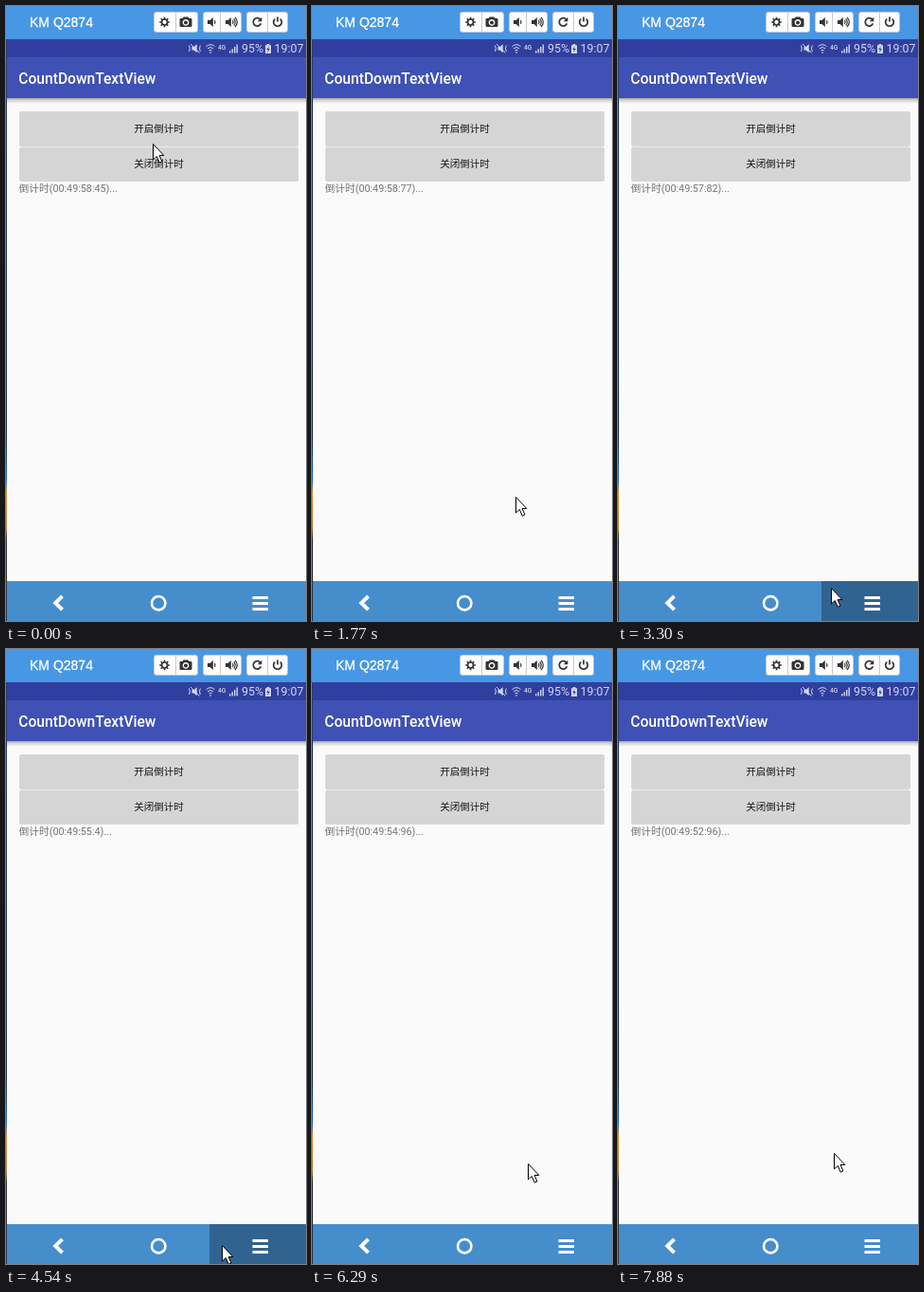
An HTML page that plays this animation: 317x648 px, repeating every 8000 ms.

```html
<!DOCTYPE html>
<html lang="zh">
<head>
<meta charset="utf-8">
<title>CountDownTextView</title>
<style>
  html, body { margin: 0; width: 100%; height: 100%; overflow: hidden; background: #fafafa; }
  svg { display: block; width: 317px; height: 648px; }
  text { font-family: Roboto, "Noto Sans CJK SC", "Noto Sans CJK", sans-serif; }
  .model { font: 14px "Liberation Sans", Arial, sans-serif; fill: #fff; stroke: #fff; stroke-width: .3; }
  .status { font-size: 12.4px; fill: #d3d7ee; }
  .title { font-size: 15.6px; font-weight: 500; fill: #fff; }
  .label { font-size: 10.5px; fill: #151515; text-anchor: middle; }
  .count { font-size: 10.75px; fill: #757575; }
  .ink { fill: #333; }
  .line { fill: none; stroke: #333; stroke-width: 1.7; }
  .thin { fill: none; stroke: #d3d7ee; stroke-width: 1; }
  .nav { fill: none; stroke: #fff; }
</style>
</head>
<body>
<svg viewBox="0 0 317 648">
  <defs>
    <linearGradient id="shade" x2="0" y2="1">
      <stop offset="0" stop-color="#000" stop-opacity=".36"/>
      <stop offset=".4" stop-color="#000" stop-opacity=".15"/>
      <stop offset="1" stop-color="#000" stop-opacity="0"/>
    </linearGradient>
    <linearGradient id="edge" x2="0" y2="1">
      <stop offset="0" stop-color="#26396b"/>
      <stop offset=".68" stop-color="#1f3550"/>
      <stop offset=".76" stop-color="#2a78b0"/>
      <stop offset=".78" stop-color="#d6a032"/>
      <stop offset=".84" stop-color="#b98a3a"/>
      <stop offset=".86" stop-color="#2b3440"/>
      <stop offset="1" stop-color="#2b3440"/>
    </linearGradient>
  </defs>

  <rect width="317" height="648" fill="#fafafa"/>

  <!-- toolbar -->
  <rect width="317" height="35" fill="#4797e5"/>
  <text class="model" x="25" y="22">KM Q2874</text>
  <g fill="#fdfdfd" stroke="#c4ccd4">
    <rect x="156.5" y="6.5" width="46" height="21" rx="2.5"/>
    <rect x="208.5" y="6.5" width="40" height="21" rx="2.5"/>
    <rect x="254.5" y="6.5" width="43" height="21" rx="2.5"/>
    <path d="M179.5 7v20M226.5 7v20M276.5 7v20"/>
  </g>
  <g transform="translate(167.5 17)" class="line">
    <circle r="3"/>
    <path id="teeth"/>
  </g>
  <g transform="translate(190 17) scale(1.08)">
    <path class="ink" d="M-6-2.5q0-1.2 1.2-1.2h1.6l1-1.5h4.4l1 1.5h1.6q1.200 0 1.200 1.200v6q0 1.200-1.200 1.200h-9.600q-1.200 0-1.200-1.200z"/>
    <circle cy=".4" r="2.5" fill="none" stroke="#fff" stroke-width="1.2"/>
  </g>
  <path class="ink" d="M213 15h2.500l3.300-3v10l-3.300-3H213zM232 15h2.500l3.300-3v10l-3.300-3H232z"/>
  <path class="line" style="stroke-width:1.2" d="M220.300 15.200q1.500 1.800 0 3.600M239.300 15.200q1.500 1.800 0 3.600M240.700 13.500q3 3.500 0 7M242 11.800q4.600 5.200 0 10.400"/>
  <path class="line" d="M268.700 14.200A4.200 4.200 0 1 0 269.400 18.400"/>
  <path class="ink" d="M270.300 11.700v4.600h-4.600z"/>
  <path class="line" d="M284.300 13.600a4.300 4.300 0 1 0 5.400 0M287 11.400v5.200"/>

  <!-- status bar -->
  <rect y="35" width="317" height="19" fill="#303f9f"/>
  <path fill="#d3d7ee" d="M196.500 43h2l3.200-2.700v8.900l-3.200-2.700h-2z"/>
  <path class="thin" d="M193.500 41.500q1.600 3.200 0 6.500M205.300 41.500q-1.600 3.200 0 6.500M195 40l9.500 9.500"/>
  <path class="thin" d="M211.500 42.600q4.500-3.800 9 0M213 44.800q3-2.500 6 0M214.500 46.900q1.500-1.200 3 0M215 49h2"/>
  <text class="status" x="224" y="45.500" style="font-size:6.600px;font-weight:500">4G</text>
  <path class="thin" style="stroke-width:1.400" d="M236.700 49.500v-2.200M239.200 49.500v-4.200M241.700 49.500v-6.500M244.200 49.500v-9"/>
  <text class="status" x="249" y="49">95%</text>
  <path fill="#d3d7ee" d="M274 41.300h1.700V40h2.600v1.300h1.700v8.700h-6z"/>
  <path fill="#303f9f" d="M277.600 42.300l-2.300 3.700h1.500l-.5 3 2.500-3.900h-1.600z"/>
  <text class="status" x="283.500" y="49">19:07</text>

  <!-- app -->
  <rect y="54" width="317" height="43" fill="#3f51b5"/>
  <rect y="97" width="317" height="6" fill="url(#shade)"/>
  <text class="title" x="13.300" y="82">CountDownTextView</text>
  <g fill="#000" fill-opacity=".14">
    <rect x="14" y="111.500" width="295" height="36.500" rx="2"/>
    <rect x="14" y="149" width="295" height="36" rx="2"/>
  </g>
  <g fill="#d5d5d5">
    <rect x="14.500" y="111" width="294" height="36" rx="1.500"/>
    <rect x="14.500" y="148.500" width="294" height="35.500" rx="1.500"/>
  </g>
  <text class="label" x="161.500" y="133">开启倒计时</text>
  <text class="label" x="161.500" y="170">关闭倒计时</text>
  <text class="count" id="count" x="13.500" y="196"></text>

  <!-- navigation -->
  <rect y="606" width="317" height="42" fill="#468dcc"/>
  <rect id="hover" x="215" y="606" width="102" height="42" fill="#316391"/>
  <path class="nav" stroke-width="4" d="M59.500 621.800l-7.300 7.200 7.300 7.200"/>
  <circle class="nav" stroke-width="2.600" cx="161.200" cy="629.200" r="7.200"/>
  <path class="nav" stroke-width="3" d="M260.500 623.500h16.500M260.500 629.500h16.500M260.500 635.500h16.500"/>
  <rect y="35" width="1" height="613" fill="url(#edge)"/>

  <path id="cursor" fill="#fff" stroke="#000" d="M.5.500V17l3.800-3.500 2.900 6.700 2.700-1.200-2.800-6.500h4.700z"/>
</svg>
<script>
  const LOOP = 8000, TICKS = 59;

  // Key poses: tick, pointer x, pointer y, ms left past 49 min.
  // The pointer starts the timer again between ticks 3 and 4.
  const poses = [
    [0, 155, 145, 58845],
    [3.2, 155, 145, 58411],
    [3.2, 155, 145, 59990],
    [7, 215, 530, 59480],
    [13, 215, 517, 58677],
    [17, 215, 520, 58140],
    [24, 225, 613, 57182],
    [33, 228, 628, 55904],
    [39, 226, 583, 55054],
    [46, 228, 542, 54196],
    [52, 228, 531, 53396],
    [59, 228, 531, 52463]
  ];

  const $ = id => document.getElementById(id);
  const count = $('count'), cursor = $('cursor'), hover = $('hover');

  let teeth = '';
  for (let a = 0; a < 360; a += 45) {
    const c = Math.cos(a * Math.PI / 180), s = Math.sin(a * Math.PI / 180);
    teeth += `M${3 * c} ${3 * s}L${5.3 * c} ${5.3 * s}`;
  }
  $('teeth').setAttribute('d', teeth);

  function poseAt(tick) {
    const i = poses.findLastIndex(p => p[0] <= tick);
    const a = poses[i], b = poses[i + 1];
    const k = (tick - a[0]) / (b[0] - a[0]);
    return a.map((v, j) => Math.round(v + (b[j] - v) * k));
  }

  function draw(now) {
    const tick = Math.floor(now % LOOP / LOOP * TICKS);
    const [, x, y, ms] = poseAt(tick);
    count.textContent = `倒计时(00:49:${Math.floor(ms / 1000)}:${ms % 100})...`;
    cursor.setAttribute('transform', `translate(${x} ${y})`);
    hover.style.display = y >= 606 ? '' : 'none';
  }

  const origin = performance.now();
  function loop() {
    draw(performance.now() - origin);
    requestAnimationFrame(loop);
  }
  loop();
</script>
</body>
</html>
```
